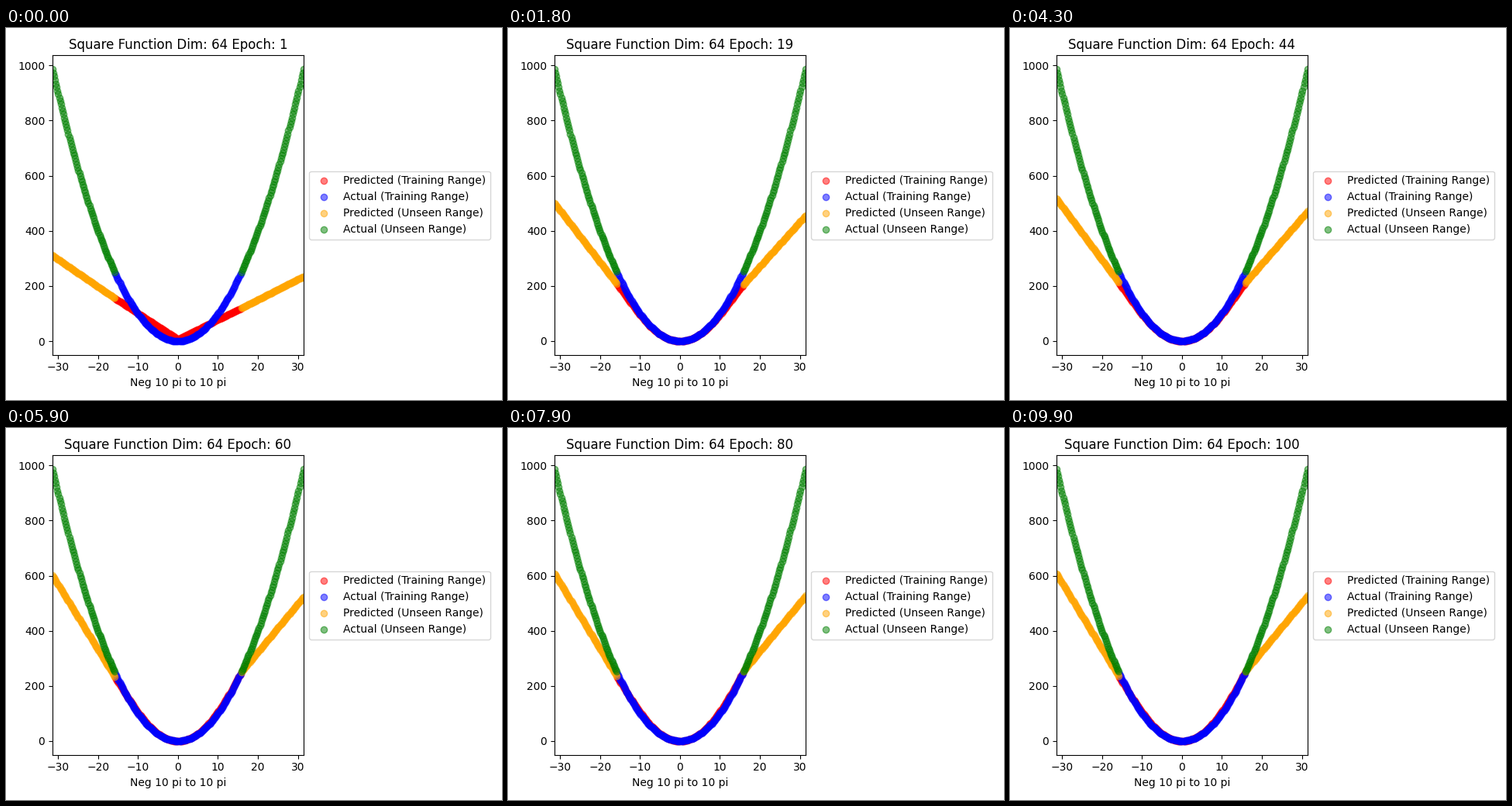
A matplotlib script for the animation above (10 s loop, 640 by 480 pixels).

```python
import numpy as np
import matplotlib.pyplot as plt
from matplotlib.animation import FuncAnimation

EPOCHS = 100
LIMIT = 10 * np.pi
EDGE = 16  # where the fit turns linear

x = np.linspace(-LIMIT, LIMIT, 300)
actual = x ** 2
seen = np.abs(x) <= 5 * np.pi


def predict(epoch):
    # quick early learning, then a second improvement past the middle
    fast = 1 - np.exp(-(epoch - 1) / 6)
    late = 1 / (1 + np.exp(-(epoch - 52) / 3))
    bend = 1 - (1 - fast) ** 2

    left = 311 + 200 * fast + 97 * late
    left_edge = 158 + 56 * fast + 25 * late
    right_edge = 121 + 90 * fast + 45 * late
    right = 235 + 232 * fast + 60 * late
    floor = 7 - 8 * fast

    lines = np.interp(x, [-LIMIT, -EDGE, 0, EDGE, LIMIT],
                      [left, left_edge, floor, right_edge, right])
    r = np.abs(x) / EDGE
    miss = np.where(x < 0, left_edge, right_edge) - EDGE ** 2
    curve = (actual + miss * r ** 5 + floor * (1 - r)
             + 8 * late * np.sin(np.pi * r ** 2))
    return np.where(r < 1, lines + bend * (curve - lines), lines)


fig, ax = plt.subplots(figsize=(6.4, 4.8), dpi=100)


def dots(mask, y, color, label):
    return ax.scatter(x[mask], y[mask], color=color, alpha=0.5, label=label)


first = predict(1)
fit_seen = dots(seen, first, "red", "Predicted (Training Range)")
dots(seen, actual, "blue", "Actual (Training Range)")
fit_unseen = dots(~seen, first, "orange", "Predicted (Unseen Range)")
dots(~seen, actual, "green", "Actual (Unseen Range)")

ax.set_xlim(-LIMIT, LIMIT)
ax.set_xlabel("Neg 10 pi to 10 pi")
ax.legend(loc="center left", bbox_to_anchor=(1, 0.5))


def update(i):
    y = predict(i + 1)
    for fit, mask in ((fit_seen, seen), (fit_unseen, ~seen)):
        fit.set_offsets(np.column_stack([x[mask], y[mask]]))
    low, high = min(actual.min(), y.min()), actual.max()
    pad = 0.05 * (high - low)
    ax.set_ylim(low - pad, high + pad)
    ax.set_title(f"Square Function Dim: 64 Epoch: {i + 1}")
    return []


update(0)
fig.tight_layout()
fig.subplots_adjust(top=1 - 35.4 / 480)
anim = FuncAnimation(fig, update, frames=EPOCHS, interval=100,
                     repeat=True, repeat_delay=0, blit=False)
plt.show()
```
